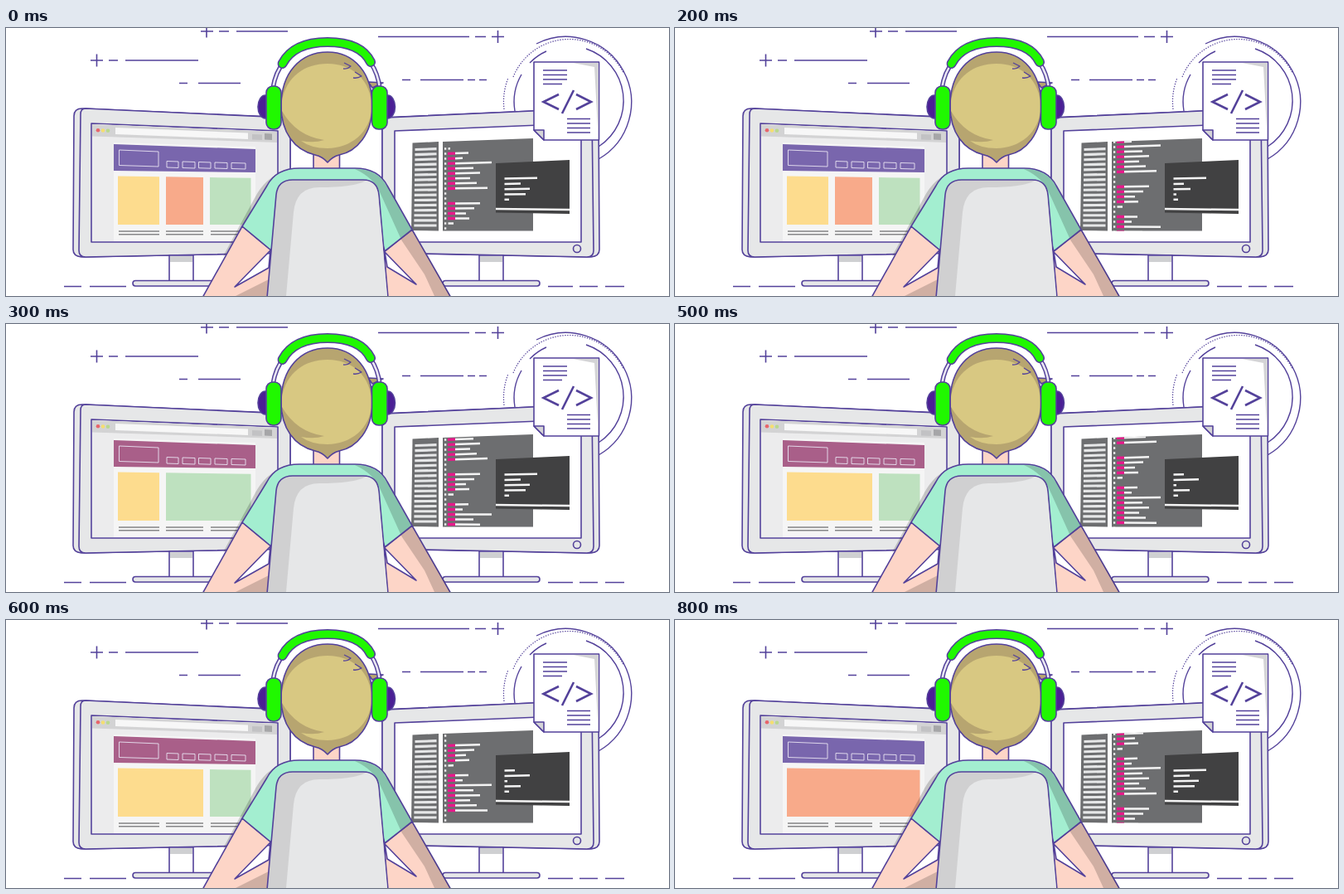
Animation of 800 by 323 pixels, one loop 0.9 s. Source, as an HTML page:

```html
<!DOCTYPE html>
<html lang="en">
<head>
<meta charset="utf-8">
<title>Programmer at work</title>
<style>
html, body { margin: 0; width: 100%; height: 100%; overflow: hidden; background: #fff; }
svg { display: block; width: 100vw; height: 100vh; fill: none; }
.ink { stroke: #53419a; stroke-width: 1.6; stroke-linejoin: round; }
.shell { fill: #e6e7e8; }
.white { fill: #fff; }
.dots { stroke-dasharray: 1.4 1.6; stroke-width: 1.2; }
.skin { fill: #fdd5c7; }
.green { fill: #20f800; }
.shade { fill: #000; opacity: .18; }
.panel { fill: #6d6e70; }
</style>
</head>
<body>
<svg viewBox="0 0 800 323" preserveAspectRatio="none">
<defs>
  <clipPath id="codeClip"><path d="M527 137L636 133V244.5H527Z"/></clipPath>
  <g id="frame" class="ink">
    <path class="shell" d="M92 97Q82 97 82 106L81 267Q81 275 91 276L343 271V108Z"/>
    <path class="shell" d="M96 97Q90 97 90 104L88 268Q88 276 96 276L343 271V112Q343 108 338 108Z"/>
    <path class="white" d="M197 274H226V305H197Z"/>
    <path d="M198 275H225V282H198Z" fill="#cfd0d2" stroke="none"/>
    <rect class="shell" x="153" y="304.5" width="117" height="6.5" rx="3.2"/>
    <path class="white" d="M103 115L328 124V258H103Z"/>
  </g>
  <path id="wires" d="M336 40Q325 53 322 73M440 42Q449 55 451 73"/>
  <path id="band" d="M333.500 43Q347 17 388 17Q428 17 440 41" stroke-linecap="round"/>
</defs>

<!-- Background marks -->
<path class="ink" d="M102 39H117M109.500 31.500V46.500M124 39H135M144 39H232
  M235 4H250M242 -3V11.500M257 4H269M278 4H340M209 66.500H219M232 66.500H283
  M449 10.500H559M566 10.500H579M586 10.500H601M593.500 3V18M478 62.500H488M500 62.500H552M557 62.500H566M571 62.500H580
  M70 311.500H91M101 311.500H145M654 311.500H684M692 311.500H714M723 311.500H746"/>
<g class="ink">
  <path class="dots" d="M601 98A79 79 0 0 1 606 60M612 59A73 73 0 0 1 745 54"/>
  <path d="M640 19A79 79 0 0 1 715 158M614 100A66 66 0 0 1 622 56M632 42A66 66 0 0 1 652 28M700 25A66 66 0 0 1 715 143" stroke-width="1.400"/>
</g>

<!-- Right monitor -->
<use href="#frame" transform="matrix(-1 0 0 1 797 0)"/>
<circle class="ink" cx="689" cy="266" r="4.500"/>
<path class="panel" d="M490.500 138.500L522 137V244.500L489 244Z"/>
<path id="sidebar" stroke="#e6e7e8" stroke-width="3.100"/>
<path class="panel" d="M527 137L636 133V244.500H527Z"/>
<g clip-path="url(#codeClip)" stroke-width="2.500">
  <path id="codeWhite" stroke="#f4f4f4"/>
  <path id="codePink" stroke="#e6198a" stroke-width="3.400"/>
</g>
<path d="M591 163L680 159V224L591 222.500Z" fill="#414142"/>
<path d="M591 218L680 219" stroke="#f4f4f4" stroke-width="2.500"/>
<path id="terminal" stroke="#f4f4f4" stroke-width="2.500"/>

<!-- Document -->
<g class="ink">
  <path class="white" d="M637 41H715.500V135H649L637 123Z"/>
  <path d="M684 42H714.700V134L710 47Z" fill="#d4d4d6" stroke="none"/>
  <path d="M637 123H649V135Z" fill="#d4d4d6"/>
  <path d="M648 51H677M648 56.500H677M648 62H677M648 67.500H671M677 109.500H705M677 115H705M677 120.500H705M677 126H705"/>
  <path d="M667 80L648.500 89L667 98M685 75L671 103M688 80L706 89L688 98" stroke-width="2.600" stroke-linejoin="miter"/>
</g>

<!-- Left monitor -->
<use href="#frame"/>
<path d="M104 116L327 125V257H104Z" fill="#ececed"/>
<path d="M130 138L301 143V257H130Z" fill="#f5f5f5"/>
<path d="M104 116L327 125V138L104 130.500Z" fill="#d3d3d4"/>
<circle cx="111" cy="123.300" r="2.300" fill="#e8646a"/>
<circle cx="117" cy="123.500" r="2.300" fill="#f5df70"/>
<circle cx="123" cy="123.700" r="2.300" fill="#b9d98f"/>
<path d="M132 120L292 126.500V134L132 128Z" fill="#f7f7f7"/>
<path d="M297 128L309 128.500V135L297 134.500Z" fill="#c2c2c4"/>
<path d="M312 127L321 127.500V135L312 134.500Z" fill="#a6a6a8"/>
<path id="banner" d="M130 140L301 146V174L130 172Z"/>
<path d="M136.500 147L184 149V167L136.500 165.500ZM194 160.500L208 161V168.500L194 168ZM213 161L228 161.500V169L213 168.500ZM232.500 161.500L247 162V169.200L232.500 168.700ZM252 162L267 162.500V169.500L252 169ZM272 162.500L289 163V170L272 169.500Z" stroke="#e9e4f2" stroke-width=".9"/>
<g id="cards"></g>
<path d="M136 245H185M193 245H238M247 245H295M136 248.700H185M193 248.700H238M247 248.700H295" stroke="#858587" stroke-width="1.500"/>

<!-- Person -->
<path class="shade" d="M262 275L300 205Q312 181 337 171L360 169L320 195L285 240L268 272Z"/>
<path class="ink skin" fill-rule="evenodd" d="M285 239L237 325H318L320 268ZM319 268L276 312L317 289Z"/>
<path class="shade" d="M277 323L317 303V323Z"/>
<path class="ink skin" fill-rule="evenodd" d="M490 243L537 325H458L457 269ZM457 270L495 309L460 288Z"/>
<path class="shade" d="M490 244L536 323H517L505 297L476 254Z"/>
<path class="ink skin" d="M371 145H402.500V174H371Z"/>
<path class="ink" fill="#a3eed0" d="M285 239L315 190Q326 169 354 169H421Q449 169 460 190L490 243L457 269L440 210H335L320 268Z"/>
<path class="shade" d="M421 170Q448 170 459 190L489 243L476 253L452 200Q445 181 421 170Z"/>
<path class="ink" fill="#d0d0d1" d="M315 325L326 201Q328 183 346 183H431Q448 183 450 201L461 325Z"/>
<path class="shell" d="M338 323L347 222Q350 192 378 192Q420 192 434 184Q447 186 449 201L460 323Z"/>

<g class="ink">
  <ellipse cx="313" cy="95" rx="9" ry="14" fill="#4b1f95"/>
  <ellipse cx="460.500" cy="95" rx="9" ry="14" fill="#4b1f95"/>
  <path fill="#b7a570" d="M437 65L455 66L442 72Z"/>
  <path fill="#b7a570" d="M332 94C332 54 355 29 388 29C420 29 442 54 442 94C442 128 423 149 402 153Q394 155 388 162Q382 155 373 153C348 147 332 126 332 94Z"/>
  <path stroke="none" fill="#d8c882" d="M333 88C338 59 360 43 388 43C418 43 441 63 441 95C441 126 415 145 388 145Q368 145 356 136Q372 139 384 135Q350 130 333 100Z"/>
  <path d="M408 42L416 46Q412 50 407 49M421 53L429 58Q424 61 419 60" stroke-width="1.300"/>
  <use href="#wires" stroke-width="5.500"/>
  <use href="#wires" stroke="#e9e6f2" stroke-width="2.600"/>
  <use href="#band" stroke-width="12"/>
  <use href="#band" stroke="#20f800" stroke-width="8.800"/>
  <rect class="green" x="314" y="70" width="18" height="52" rx="8"/>
  <rect class="green" x="441.500" y="70" width="18.500" height="52" rx="8"/>
</g>
</svg>
<script>
const el = id => document.getElementById(id);
const STEP = 100, STEPS = 9;

const YELLOW = '#fddc8e', ORANGE = '#f8aa8a', MINT = '#bee1bf';
const PURPLE = '#7966ad', PLUM = '#a95f89';
// Each card is [left, right, colour].
const pages = [
  { banner: PURPLE, cards: [[135, 185, YELLOW], [193, 238, ORANGE], [246, 295.5, MINT]] },
  { banner: PLUM, cards: [[135, 185, YELLOW], [193, 295.5, MINT]] },
  { banner: PLUM, cards: [[135, 238, YELLOW], [246, 295.5, MINT]] },
  { banner: PURPLE, cards: [[135, 295.5, ORANGE]] }
];
const pageOrder = [0, 0, 0, 1, 1, 2, 2, 3, 3];

// Right ends of terminal lines.
const outputs = [
  [641, 621, 632, 627, 607],
  [641, 614, 622, 605, 607],
  [614, 632, 605, 621, 607]
];
const outputOrder = [0, 1, 1, 0, 0, 2, 2, 2, 0];

// Right ends of code lines; 0 is an empty line.
const code = [558, 551, 586, 564, 572, 560, 568, 581, 0, 0, 572, 565, 555, 559, 540, 0];
const ROW = 6, SCROLL = 10, BRACE = 14;

// Horizontal stroke following the perspective of the screen.
function line(x1, x2, y, origin) {
  const slope = (y - 232) * 0.0004;
  return `M${x1} ${y + slope * (x1 - origin)}L${x2} ${y + slope * (x2 - origin)}`;
}

function drawPage({ banner, cards }) {
  el('banner').setAttribute('fill', banner);
  const top = x => 178.5 + (x - 135) * 0.014;
  el('cards').innerHTML = cards.map(([a, b, colour]) =>
    `<path fill="${colour}" d="M${a} ${top(a)}L${b} ${top(b)}V237H${a}Z"/>`).join('');
}

function drawCode(step) {
  let white = '', pink = '';
  for (let row = -1; row < 32; row++) {
    const y = 151.5 + row * ROW - step * SCROLL;
    if (y < 132 || y > 247) continue;
    const index = (row + 16) % 16, end = code[index];
    white += line(529, 531.3, y, 530);
    if (row === -1) white += line(533.5, 536, y, 530);
    if (!end) continue;
    white += line(index === BRACE ? 533.5 : 542, end, y, 530);
    if (index !== BRACE) pink += line(533, 542, y, 530);
  }
  el('codeWhite').setAttribute('d', white);
  el('codePink').setAttribute('d', pink);
}

function drawTerminal(ends) {
  el('terminal').setAttribute('d',
    ends.map((end, i) => line(601.5, end, 181.6 + i * 6.3, 602)).join(''));
}

el('sidebar').setAttribute('d',
  Array.from({ length: 16 }, (_, i) => line(493.5 - i * 0.08, 519.5, 146.5 + i * 6.1, 494)).join(''));

let shown = -1;
function tick() {
  const step = Math.floor(performance.now() / STEP) % STEPS;
  if (step !== shown) {
    shown = step;
    drawPage(pages[pageOrder[step]]);
    drawCode(step);
    drawTerminal(outputs[outputOrder[step]]);
  }
  requestAnimationFrame(tick);
}
tick();
</script>
</body>
</html>
```
